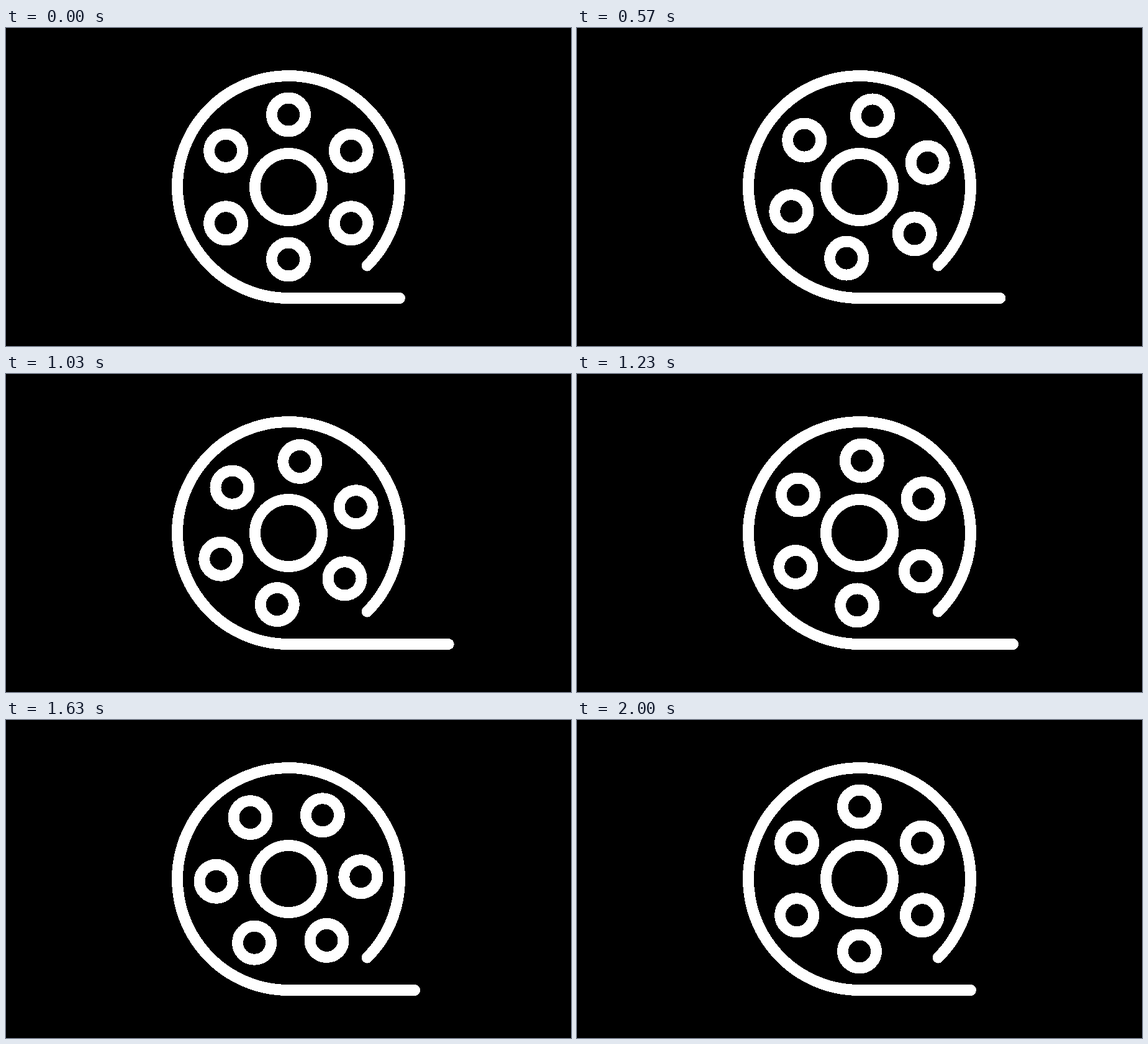
Animation, 910 px wide and 512 px high, one loop 2.03 s. Source, as an HTML page:

```html
<!DOCTYPE html>
<html lang="en">
<head>
<meta charset="utf-8">
<title>Film reel</title>
<style>
  html, body { margin: 0; width: 100%; height: 100%; overflow: hidden; background: #000; }
  svg { display: block; width: 910px; height: 512px; }
</style>
</head>
<body>
<svg viewBox="0 0 910 512" fill="none" stroke="#fff" stroke-width="18" stroke-linecap="round" shape-rendering="crispEdges">
  <path id="strip"/>
  <circle cx="455" cy="256" r="54"/>
  <g id="holes"></g>
</svg>
<script>
  const LOOP = 2030, FRAMES = 60;
  const CX = 455, CY = 256, RIM = 179, ORBIT = 116.5, PULL = 79;
  const strip = document.getElementById('strip');
  const holes = Array.from({ length: 6 }, () => {
    const hole = document.createElementNS('http://www.w3.org/2000/svg', 'circle');
    hole.setAttribute('r', 27);
    return document.getElementById('holes').appendChild(hole);
  });

  const ease = x => x * x * (3 - 2 * x);

  // 30 steps per second, with start times rounded to 10 ms
  const stepAt = ms => Math.floor((Math.floor(ms / 10) + 0.5) * 0.3);

  function draw(ms) {
    const p = stepAt(ms % LOOP) / FRAMES;
    const turn = 2 * Math.PI * ease(p);
    const out = PULL * ease(1 - Math.abs(1 - 2 * p));
    const d = RIM * Math.SQRT1_2;

    holes.forEach((hole, i) => {
      const a = turn + (i - 1.5) * Math.PI / 3;
      hole.setAttribute('cx', CX + ORBIT * Math.cos(a));
      hole.setAttribute('cy', CY + ORBIT * Math.sin(a));
    });
    strip.setAttribute('d',
      `M${CX + d} ${CY + d}A${RIM} ${RIM} 0 1 0 ${CX} ${CY + RIM}H${CX + RIM + out}`);
  }

  const start = performance.now();
  function tick() {
    draw(performance.now() - start);
    requestAnimationFrame(tick);
  }
  tick();
</script>
</body>
</html>
```
